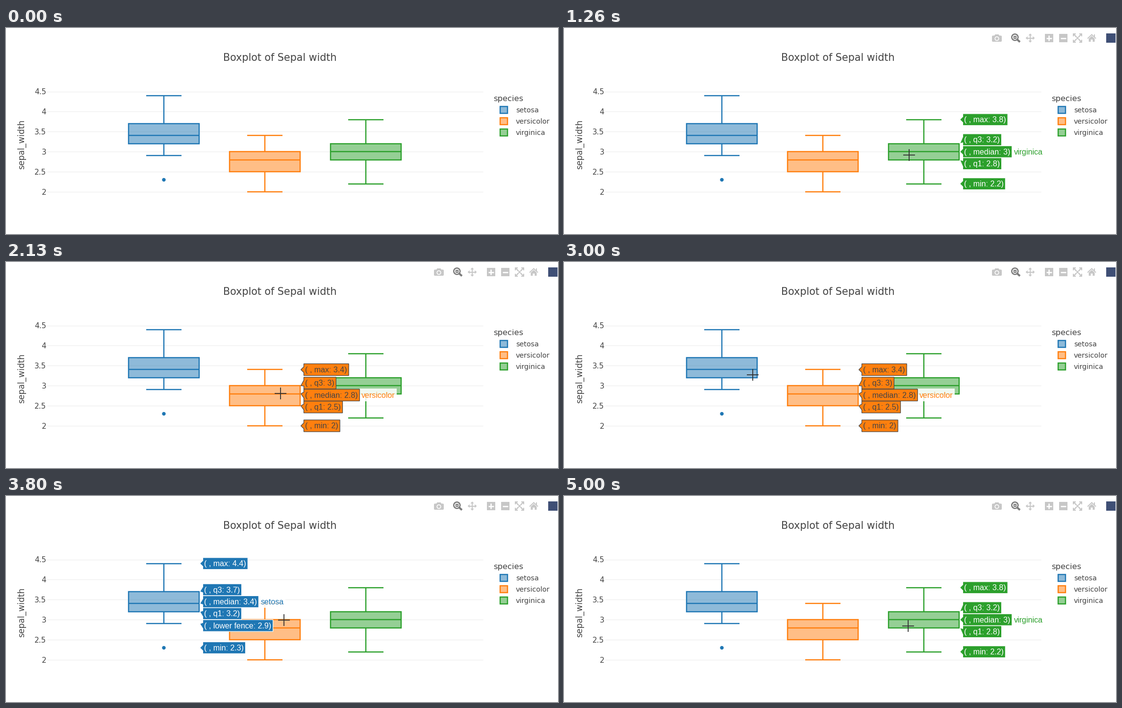
A matplotlib script for the animation above (5.2 s loop, 1126 by 420 pixels).

```python
import numpy as np
import matplotlib.pyplot as plt
from matplotlib.animation import FuncAnimation
from matplotlib.patches import Circle, Polygon, Rectangle, FancyBboxPatch

W, H, DPI = 1126, 420, 100
LOOP, INTERVAL = 5200, 40
PT = 72 / DPI
INK, ICON, ICON_ON = "#444444", "#c7c7c7", "#7c7c7c"
BLUE, ORANGE, GREEN = "#1f77b4", "#ff7f0e", "#2ca02c"
LABEL_STEP = 24.4

# name, colour, label edge and text, centre x, whiskers and quartiles
SPECIES = [
    ("setosa", BLUE, "white", 322, (2.9, 3.2, 3.4, 3.7, 4.4)),
    ("versicolor", ORANGE, INK, 528, (2, 2.5, 2.8, 3, 3.4)),
    ("virginica", GREEN, "white", 734, (2.2, 2.8, 3, 3.2, 3.8)),
]
OUTLIER = 2.3

# time, x, y of the pointer
POINTER = np.array([
    (930, 740, 250), (1400, 690, 262), (1800, 560, 268), (2730, 560, 268),
    (2870, 490, 255), (3000, 385, 230), (3200, 380, 224), (3333, 381, 226),
    (3530, 381, 226), (3760, 540, 250), (4000, 702, 265),
])
HOVERS = [(0, None), (330, "virginica"), (1930, "versicolor"),
          (3130, "setosa"), (3860, "virginica")]

fig = plt.figure(figsize=(W / DPI, H / DPI), dpi=DPI, facecolor="white")
ax = fig.add_axes([0, 0, 1, 1])
ax.set_xlim(0, W)
ax.set_ylim(H, 0)
ax.axis("off")


def y_of(value):
    return 129.5 + (4.5 - value) * 81.8


def line(xs, ys, color, width=2.4, z=3):
    return ax.plot(xs, ys, color=color, lw=width * PT, zorder=z,
                   solid_capstyle="butt", solid_joinstyle="miter")[0]


def text(x, y, s, size, color=INK, font="DejaVu Sans", z=3, **kw):
    return ax.text(x, y, s, fontsize=size * PT, color=color, family=font,
                   va="baseline", zorder=z, **kw)


def rect(x0, y0, x1, y1, fill, edge="none", width=0, z=3, alpha=None):
    return ax.add_patch(Rectangle((x0, y0), x1 - x0, y1 - y0, fc=fill, ec=edge,
                                  lw=width * PT, zorder=z, alpha=alpha))


def shape(points, fill, edge="none", width=0, z=3):
    return ax.add_patch(Polygon(points, closed=True, fc=fill, ec=edge,
                                lw=width * PT, zorder=z, joinstyle="miter"))


def disc(x, y, r, fill, edge="none", width=0, z=3):
    return ax.add_patch(Circle((x, y), r, fc=fill, ec=edge, lw=width * PT, zorder=z))


def draw_axes():
    text(443, 67, "Boxplot of Sepal width", 20.6)
    text(37, 237, "sepal_width", 17.1, rotation=90, rotation_mode="anchor", ha="center")
    for value in np.arange(2, 4.6, 0.5):
        y = y_of(value)
        line((84, 973), (y, y), "#eeeeee", 1.2, 1)
        text(82, y + 5.5, f"{value:g}", 15.1, ha="right")


def draw_box(color, cx, stats):
    low, q1, median, q3, high = map(y_of, stats)
    rect(cx - 72.4, q3, cx + 72.4, q1, color, alpha=0.5, z=2)
    rect(cx - 72.4, q3, cx + 72.4, q1, "none", color, 2.4)
    line((cx - 72.4, cx + 72.4), (median, median), color)
    for end, side in ((low, q1), (high, q3)):
        line((cx, cx), (end, side), color)
        line((cx - 36, cx + 36), (end, end), color)


def draw_legend():
    text(994, 149, "species", 16.4)
    for i, (name, color, *_) in enumerate(SPECIES):
        y = 167 + 23 * i
        rect(1007.8, y - 7.3, 1022.8, y + 7.3, color, alpha=0.5, z=2)
        rect(1007.8, y - 7.3, 1022.8, y + 7.3, "none", color, 2.4)
        text(1040, y + 5, name, 14.3)


def draw_label(x, y, shift, caption, fill, ink):
    """Flag with its tip at (x, y) and its body moved down by shift."""
    left, mid, half = x + 6, y + shift, LABEL_STEP / 2 - 0.2
    words = text(left + 3, mid + 5.5, caption, 16, ink, "Liberation Sans", 7)
    right = left + 6 + words.get_window_extent().width
    flag = shape([(x, y), (left, mid + 6), (left, mid + half), (right, mid + half),
                  (right, mid - half), (left, mid - half), (left, mid - 6)],
                 fill, ink, 1.2, 6)
    return right, [words, flag]


def draw_hover(name, color, ink, cx, stats):
    low, q1, median, q3, high = stats
    stack = [("q3", q3), ("median", median), ("q1", q1)]
    lowest = low
    if name == "setosa":
        stack.append(("lower fence", low))
        lowest = OUTLIER
    middle = np.mean([y_of(v) for _, v in stack])
    rows = [("max", high, 0), ("min", lowest, 0)]
    for i, (key, value) in enumerate(stack):
        place = middle + (i - (len(stack) - 1) / 2) * LABEL_STEP
        rows.append((key, value, place - y_of(value)))

    artists = []
    for key, value, shift in rows:
        right, parts = draw_label(cx + 73.5, y_of(value), shift,
                                  f"( , {key}: {value:g})", color, ink)
        artists += parts
        if key == "median":
            mid = y_of(value) + shift
            tag = text(right + 4, mid + 5.5, name, 16, color, "Liberation Sans", 7)
            end = right + 7 + tag.get_window_extent().width
            artists += [tag, rect(right, mid - 13, end, mid + 13, "white", z=5, alpha=0.88)]
    return artists


def draw_toolbar():
    # camera
    ax.add_patch(FancyBboxPatch((874, 16.5), 18, 10.5, fc=ICON, ec="none", zorder=3,
                                boxstyle="round,pad=1,rounding_size=2"))
    shape([(877, 17), (879.5, 13), (886.5, 13), (889, 17)], ICON)
    disc(883, 21.7, 4.6, "white")
    disc(883, 21.7, 3, ICON)
    # magnifier
    line((924.5, 930), (23.5, 28.5), ICON_ON, 4)
    disc(919.8, 18.8, 6.4, "white", ICON_ON, 2.6)
    rect(917, 16, 922.6, 21.6, ICON_ON)
    rect(918.8, 17.8, 920.8, 19.8, "white")
    # pan arrows
    line((944, 958), (20.5, 20.5), ICON, 2)
    line((951, 951), (13, 28), ICON, 2)
    for dx, dy in ((1, 0), (-1, 0), (0, 1), (0, -1)):
        shape([(951 + 9.3 * dx, 20.5 + 9.3 * dy),
               (951 + 5.3 * dx + 3.6 * dy, 20.5 + 5.3 * dy + 3.6 * dx),
               (951 + 5.3 * dx - 3.6 * dy, 20.5 + 5.3 * dy - 3.6 * dx)], ICON)
    # zoom in and out
    for cx in (989.4, 1018.4):
        rect(cx - 8.7, 12, cx + 8.7, 29, ICON)
        line((cx - 5.5, cx + 5.5), (20.5, 20.5), "white", 2.6, 4)
    line((989.4, 989.4), (15, 26), "white", 2.6, 4)
    # autoscale
    for sx in (-1, 1):
        for sy in (-1, 1):
            x, y = 1047.5 + 8.8 * sx, 20.5 + 8.8 * sy
            line((x - 5.5 * sx, x, x), (y, y, y - 5.5 * sy), ICON, 2)
            line((1047.5 + 2 * sx, x), (20.5 + 2 * sy, y), ICON, 2.4)
    disc(1047.5, 20.5, 2.2, ICON)
    # home
    line((1068, 1076.5, 1085), (21.5, 13.5, 21.5), ICON, 2)
    rect(1081, 13, 1083.4, 18.5, ICON)
    shape([(1070.5, 21.8), (1076.5, 16.2), (1082.5, 21.8), (1082.5, 28),
           (1078.5, 28), (1078.5, 23.5), (1074.5, 23.5), (1074.5, 28), (1070.5, 28)], ICON)
    # brand badge as a plain square
    rect(1106, 11, 1125, 30, "#3f4f75")


draw_axes()
draw_legend()
draw_toolbar()
disc(322, y_of(OUTLIER), 3.7, BLUE)
hovers = {}
for name, color, ink, cx, stats in SPECIES:
    draw_box(color, cx, stats)
    hovers[name] = draw_hover(name, color, ink, cx, stats)
toolbar_cover = rect(860, 5, W, 36, "white", z=8)
cross = [line((0, 0), (0, 0), "#333333", 1.8, 9) for _ in range(2)]


def update(i):
    step = int(((i + 0.5) * INTERVAL + 7) * 0.015)
    t = step * 1000 / 15
    toolbar_cover.set_alpha(float(np.interp(t, (0, 333), (1, 0))))

    active = [name for start, name in HOVERS if t >= start][-1]
    for name, artists in hovers.items():
        for artist in artists:
            artist.set_visible(name == active)

    x, y = (np.interp(t, POINTER[:, 0], POINTER[:, k]) for k in (1, 2))
    cross[0].set_data((x - 12, x + 12), (y, y))
    cross[1].set_data((x, x), (y - 12, y + 12))
    for bar in cross:
        bar.set_visible(t >= POINTER[0, 0])
    return [toolbar_cover, *cross]


anim = FuncAnimation(fig, update, frames=LOOP // INTERVAL, interval=INTERVAL,
                     repeat=True, repeat_delay=0, blit=False)
plt.show()
```
